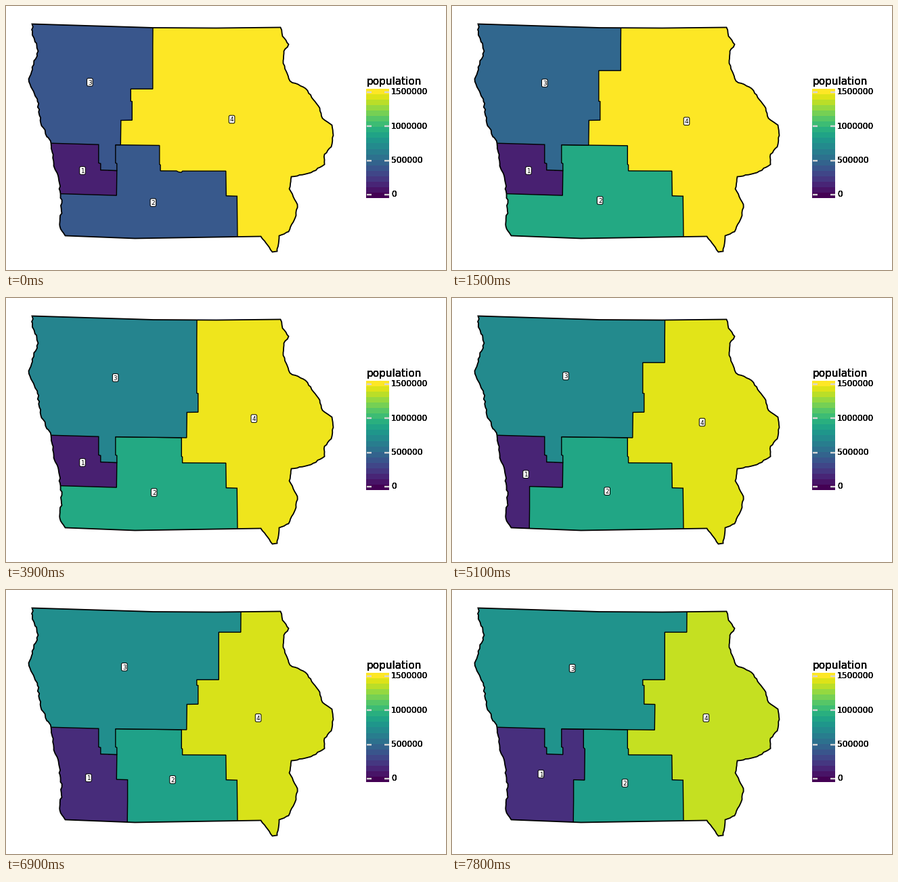
A matplotlib script that plays this animation: 650 px wide and 389 px high, repeating every 8 s.

```python
import numpy as np
import matplotlib.pyplot as plt
from matplotlib.animation import FuncAnimation
from matplotlib.patches import FancyBboxPatch, Polygon, Rectangle
from matplotlib.path import Path

W, H, DPI = 650, 389, 100
PX = 72 / DPI
STEPS, TICKS_PER_STEP, TICK_MS, TICKS = 26, 3, 100, 80
VIRIDIS = plt.get_cmap("viridis")
MAX_POP = 1500
CELL = 32.5

START_POP = {1: 133, 2: 412, 3: 404, 4: 2229}  # thousands
BORDERS = [(4, 3), (4, 2), (2, 1)]             # (giver, taker)

# Row of counties: (taker, its first east edge, middle y, thousands per county)
ROWS = {
    1: (3, 184.5, 45, 9.5), 2: (3, 184.5, 76, 24), 3: (3, 184.5, 113, 13),
    4: (3, 184.5, 150, 23), 5: (3, 170, 186, 37), 6: (1, 162, 224, 9),
    7: (1, 164, 261, 9), 8: (1, 82.3, 295, 9), 9: (1, 82.3, 325, 9),
    10: (2, 227, 224, 492),
}
START_COUNT = {row: int(row <= 3) for row in ROWS}

EAST = [(405, 31), (408, 44), (417, 56), (410, 66), (409, 84), (419, 110),
        (442, 121), (463, 150), (467, 165), (481, 175), (483, 190), (480, 207),
        (470, 218), (470, 233), (450, 245), (421, 251), (418, 269), (430, 292),
        (428, 308), (417, 332), (403, 338), (400, 361), (393, 362), (376, 339)]
SOUTH = [(342, 339.5), (190, 342)]
WEST = [(87, 338), (79, 324), (82, 290), (80, 276), (77, 252), (70, 235),
        (66, 202), (52, 176), (46, 140), (33, 107), (47, 66), (40, 45), (38, 26)]
NORTH = [(217, 31.5), (310, 32)]


def river(points, rng, wobble, piece=4):
    """Walk along the key points in short pieces with a seeded wobble."""
    out = []
    for a, b in zip(np.array(points), np.array(points)[1:]):
        n = max(1, round(np.hypot(*(b - a)) / piece))
        for t in np.arange(n) / n:
            out.append(a + (b - a) * t + rng.uniform(-wobble, wobble, 2) * (t > 0))
    return out + [points[-1]]


def mid_line(x):
    return 201.5 + 4.5 * np.sqrt(max(x - 66, 0) / 234)


def county_line(x):
    return 274 + 0.03 * x


def low_line(x):
    return 306 + 0.025 * x


def east_edge(n, row):
    return ROWS[row][1] + CELL * n[row]


def northwest(n):
    x1, x2, x3, x4, x5 = (east_edge(n, row) for row in range(1, 6))
    y1 = 62 if n[1] == 5 else 58
    y3 = 132 if n[4] else 122
    return [(0, 0), (x1 + 0.5, 0), (x1, y1), (x2, y1), (x2, 95), (x3, 95),
            (x3, y3), (x4, y3), (x4, 140), (x4 + 2, 140.5), (x4 + 2, 168),
            (x5, 168.3), (x5 - 0.5, mid_line(x5)), (162, mid_line(162)),
            (162, 231), (164, 232), (164, 242.3), (140, 241.5), (140, 232),
            (137, 231), (137, mid_line(137)), (66, 202), (0, 200)]


def southwest(n):
    x6, x7 = east_edge(n, 6), east_edge(n, 7)
    x8, x9 = (east_edge(n, row) if n[row] else 0 for row in (8, 9))
    if n[6]:
        top = [(162, mid_line(162)), (x6, mid_line(x6)), (x6, 232), (x7, 234)]
    else:
        top = [(152, 242), (164, 242.3), (x7, 243)]
    return [(0, 150), (130, 150), (150, 215), *top,
            (x7 - 0.5, county_line(x7)), (x8, county_line(x8)),
            (x8, low_line(x8)), (x9, low_line(x9)), (x9 - 0.7, 370), (0, 370)]


def south(n):
    x = east_edge(n, 10)
    bump = [] if n[10] else [(252, 242.8), (255, 244.3), (259, 245), (261, 243)]
    return [(0, 210), (150, 225), (162, mid_line(162)), (x, mid_line(x)),
            (x, 233), (x + 1.3, 234), (x + 1.3, 242.7), *bump, (325, 243),
            (325.5, 279.5), (341.5, 280), (342.5, 370), (0, 370)]


OUTLINES = {2: south, 1: southwest, 3: northwest}  # in painting order


def survey(n, grid):
    """Outlines of the districts and the centre of the area each one keeps."""
    shapes = {d: np.array(f(n)) - (0.7, 0.3) for d, f in OUTLINES.items()}
    owner = np.full(len(grid), 4)
    for d, shape in shapes.items():
        owner[Path(shape).contains_points(grid)] = d
    return shapes, {d: grid[owner == d].mean(axis=0) for d in START_POP}


def simulate(grid):
    """The most unequal neighbours trade the county lying nearest the taker."""
    pops, n, states = dict(START_POP), dict(START_COUNT), []
    for _ in range(STEPS + 1):
        shapes, centres = survey(n, grid)
        states.append((dict(pops), shapes, centres))
        giver, taker = max(BORDERS, key=lambda b: pops[b[0]] - pops[b[1]])
        toward = centres[giver] - centres[taker]
        rows = [r for r in ROWS if ROWS[r][0] == taker and (r != 6 or n[7])]
        row = min(rows, key=lambda r: toward @ (east_edge(n, r) + CELL / 2, ROWS[r][2]))
        n[row] += 1
        pops[giver] -= ROWS[row][3]
        pops[taker] += ROWS[row][3]
    return states


fig = plt.figure(figsize=(W / DPI, H / DPI), dpi=DPI, facecolor="white")
ax = fig.add_axes([0, 0, 1, 1])
ax.set(xlim=(-0.5, W - 0.5), ylim=(H - 0.5, -0.5))
ax.axis("off")

rng = np.random.default_rng(4)
border = np.array(river(EAST, rng, 0.7) + SOUTH + river(WEST, rng, 1.3) + NORTH)
land = Polygon(border, ec="none", zorder=1)
ax.add_patch(land)
ax.add_patch(Polygon(border, fill=False, ec="black", lw=1.8 * PX, zorder=6))

grid = np.stack(np.meshgrid(np.arange(0, W, 2), np.arange(0, H, 2)), -1).reshape(-1, 2)
states = simulate(grid[Path(border).contains_points(grid)])

districts = {4: land}
for z, d in enumerate(OUTLINES, start=2):
    districts[d] = Polygon([(0, 0), (1, 0), (0, 1)], ec="black", lw=1.4 * PX,
                           joinstyle="miter", zorder=z)
    ax.add_patch(districts[d])
    districts[d].set_clip_path(land)

tags = {}
for d in START_POP:
    box = FancyBboxPatch((0, 0), 5, 8, boxstyle="round,pad=2,rounding_size=2",
                         fc="white", ec="black", lw=PX, zorder=8)
    ax.add_patch(box)
    text = ax.text(0, 0, str(d), fontsize=6.4, family="DejaVu Sans",
                   ha="center", va="center_baseline", zorder=9)
    tags[d] = box, text


def heavy_text(x, y, s, size):
    for _ in range(4):
        ax.text(x, y, s, fontsize=size, family="DejaVu Sans", va="baseline")


def draw_legend():
    left, right, top, bottom, bins = 531.5, 565.5, 121.5, 282.5, 20
    band = (bottom - top) / bins
    for i in range(bins):
        ax.add_patch(Rectangle((left, bottom - (i + 1) * band), right - left, band,
                               fc=VIRIDIS(i / (bins - 1)), ec="none",
                               antialiased=False))
    heavy_text(532, 115.5, "population", 11)
    for k in range(4):
        y = 277.5 - 50.3 * k
        for x in (left + 1, right - 7.5):
            ax.plot([x, x + 7], [y, y], color="#d6d6d6", lw=2.4 * PX,
                    solid_capstyle="butt")
        heavy_text(568.5, y + 3.3, str(500000 * k), 8.8)


def update(tick):
    pops, shapes, centres = states[tick // TICKS_PER_STEP]
    for d, patch in districts.items():
        patch.set_facecolor(VIRIDIS(min(pops[d] / MAX_POP, 1.0)))
        if d in shapes:
            patch.set_xy(shapes[d])
        x, y = centres[d]
        box, text = tags[d]
        box.set_bounds(x - 2.3, y - 3.8, 4.6, 7.6)
        text.set_position((x, y))
    return []


draw_legend()
anim = FuncAnimation(fig, update, frames=TICKS, interval=TICK_MS,
                     repeat=True, repeat_delay=0, blit=False)
plt.show()
```
